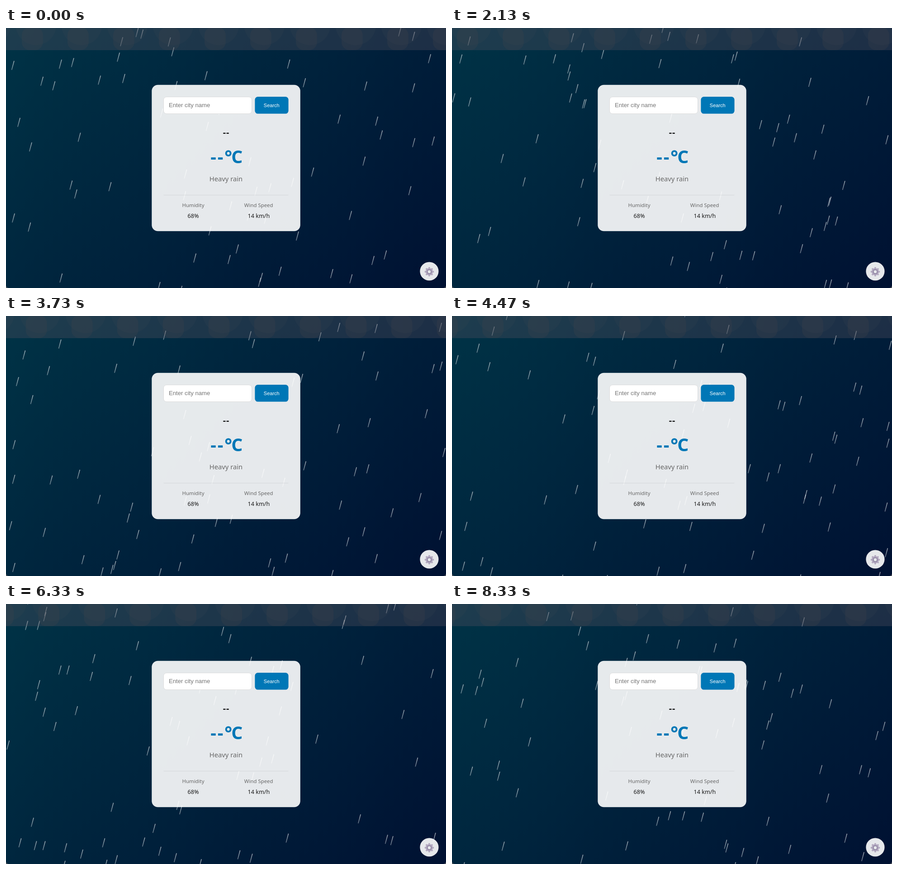
Animation of 973x575 px, one loop 8.4 s. Source, as an HTML page with a canvas:

```html
<!DOCTYPE html>
<html lang="en">
<head>
<meta charset="utf-8">
<title>Weather</title>
<style>
  html, body { margin: 0; width: 100%; height: 100%; overflow: hidden; background: #55595e; }
  #stage {
    position: relative; width: 973px; height: 575px; overflow: hidden;
    background: linear-gradient(135deg, #003346, #001132);
    border-radius: 0 0 6px 6px;
  }
  canvas, svg { position: absolute; left: 0; top: 0; }
  text { font-family: "Segoe UI", "Open Sans", "Noto Sans", sans-serif; text-anchor: middle; }
  .panel { fill: #fff; fill-opacity: .9; }
  .ui { font-family: "Liberation Sans", Arial, sans-serif; }
  .label { font-size: 11.4px; fill: #666; }
  .value { font-size: 12.7px; fill: #1a1a1a; }
</style>
</head>
<body>
<div id="stage">
  <canvas id="sky" width="973" height="575"></canvas>
  <svg width="973" height="575" viewBox="0 0 973 575">
    <rect class="panel" x="322.3" y="125.7" width="328.5" height="323.5" rx="13.5"/>
    <rect x="348.5" y="152.5" width="195" height="37" rx="6.5" fill="#fff" stroke="#ddd"/>
    <text class="ui" x="360" y="175" font-size="13.15" fill="#757575" style="text-anchor:start">Enter city name</text>
    <rect x="550.4" y="152" width="74.2" height="37.6" rx="6.5" fill="#0077b6"/>
    <text class="ui" x="587.3" y="175" font-size="11" fill="#fff">Search</text>

    <text x="487" y="238" font-size="19.7" font-weight="700" fill="#111" letter-spacing="1">--</text>
    <text x="487" y="298.5" font-size="39.4" font-weight="700" fill="#0077b6"><tspan letter-spacing="2.8">--</tspan><tspan letter-spacing="-1.8">°C</tspan></text>
    <text x="486.5" y="338.5" font-size="14.75" fill="#666">Heavy rain</text>

    <path d="M348.5 369.5H624.5" stroke="#000" stroke-opacity=".08"/>
    <text class="label" x="414" y="396">Humidity</text>
    <text class="value" x="414" y="420">68%</text>
    <text class="label" x="558.7" y="396">Wind Speed</text>
    <text class="value" x="558.9" y="420">14 km/h</text>

    <circle class="panel" cx="936" cy="538" r="20.6"/>
    <g transform="translate(936 539)" fill="none">
      <circle r="8.4" stroke="#b3a9c0" stroke-width="3.6" pathLength="16" stroke-dasharray="1" stroke-dashoffset=".5"/>
      <circle r="5.8" stroke="#b0a6be" stroke-width="4.4"/>
      <circle r="4.3" stroke="#8f84a2" stroke-width="1.8"/>
    </g>
  </svg>
</div>
<script>
const W = 973, H = 575, LOOP = 8400, RATE = 15;
const BAND = 49, CLOUD_GAP = 101, CLOUD_START = 58.4, CLOUD_SPEED = -0.1059;
const DROPS = 73, MARGIN = 20, TRAVEL = H + 2 * MARGIN;
const ctx = document.getElementById('sky').getContext('2d');

function random(a, b) {
  const s = Math.sin(a * 127.1 + b * 311.7 + 17.3) * 43758.5453;
  return s - Math.floor(s);
}

const streak = ctx.createLinearGradient(0, -10, 0, 10);
streak.addColorStop(0, 'rgba(255,255,255,.62)');
streak.addColorStop(1, 'rgba(255,255,255,.4)');

function drawDrop(x, y) {
  ctx.save();
  ctx.translate(x, y);
  ctx.rotate(Math.PI / 12);
  ctx.fillStyle = streak;
  ctx.fillRect(-0.8, -10.3, 1.6, 20.6);
  ctx.restore();
}

// Each drop falls at its own pace and picks a new column on every turn.
function drawRain(t) {
  for (let i = 0; i < DROPS; i++) {
    const period = 500 + 500 * random(i, 1);
    const phase = random(i, 2) + t / period;
    const turn = Math.floor(phase);
    drawDrop(random(i, turn + 3) * W, (phase - turn) * TRAVEL - MARGIN);
  }
}

function drawClouds(t) {
  ctx.save();
  ctx.beginPath();
  ctx.rect(0, 0, W, BAND);
  ctx.clip();
  ctx.fillStyle = 'rgba(84,80,96,.35)';
  ctx.fillRect(0, 0, W, BAND);
  const shift = (CLOUD_START + CLOUD_SPEED * t) % CLOUD_GAP;
  for (let x = shift - CLOUD_GAP; x < W + CLOUD_GAP; x += CLOUD_GAP) {
    ctx.fillStyle = 'rgba(66,70,80,.16)';
    ctx.beginPath();
    ctx.arc(x + 8, -7, 45, 0, 2 * Math.PI);
    ctx.fill();
    ctx.fillStyle = 'rgba(68,70,74,.22)';
    ctx.beginPath();
    ctx.roundRect(x - 23.5, -2, 47, BAND + 2, 18);
    ctx.fill();
  }
  ctx.restore();
}

function draw(now) {
  const step = Math.floor((now % LOOP) * RATE / 1000 + 0.06) % (LOOP * RATE / 1000);
  const t = step * 1000 / RATE;
  ctx.clearRect(0, 0, W, H);
  drawRain(t);
  drawClouds(t);
}

const begin = performance.now();
function tick() {
  draw(performance.now() - begin);
  requestAnimationFrame(tick);
}
tick();
</script>
</body>
</html>
```
